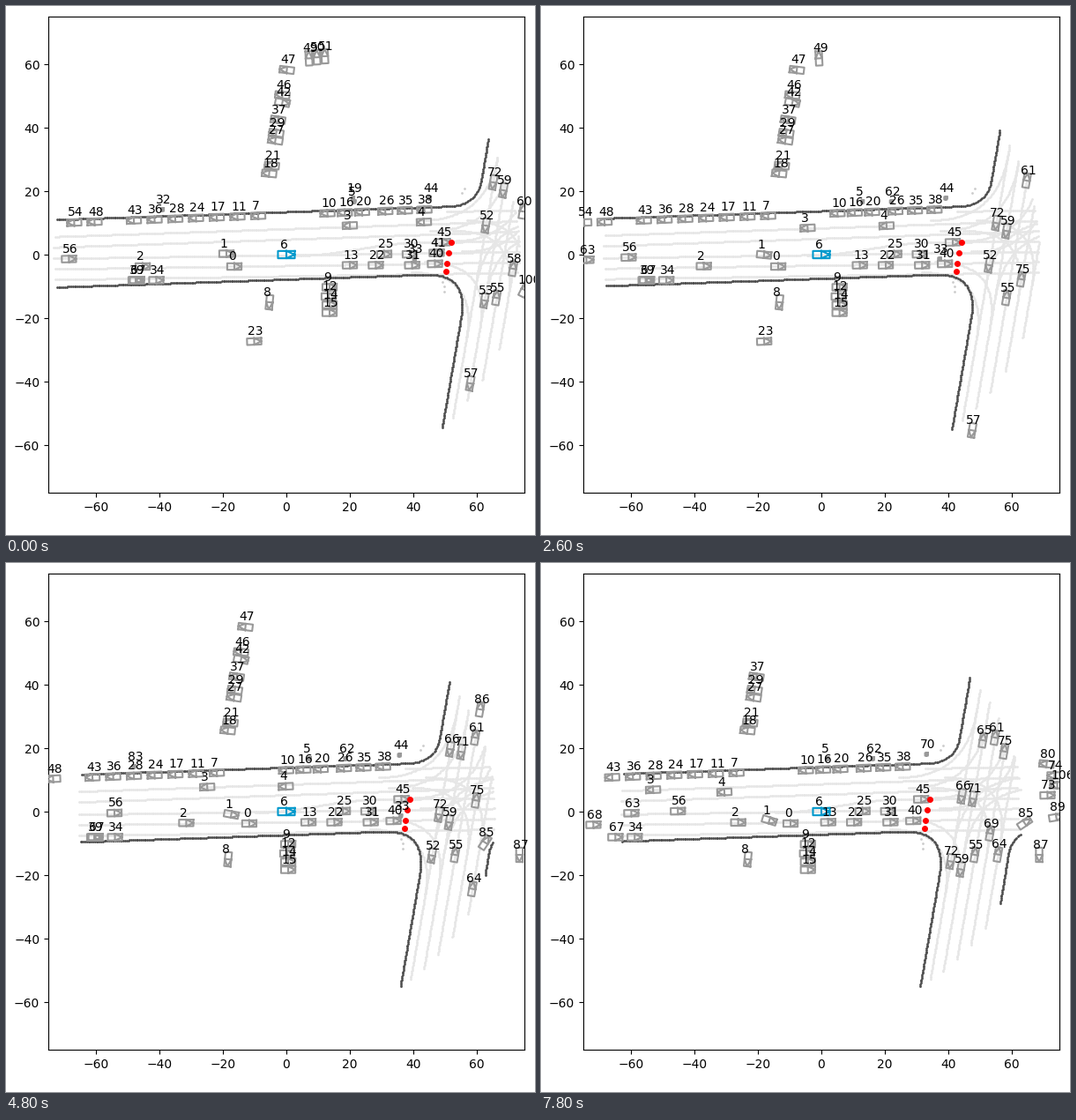
A matplotlib script that plays this animation: 600x600 px, repeating every 8000 ms.

```python
import numpy as np
import matplotlib.pyplot as plt
from matplotlib.animation import FuncAnimation

FRAMES, INTERVAL = 40, 200
SCALE, CX, CY = 3.6, 318, 282          # pixels per metre, ego position
LIMIT, VIEW = 75, 77
LAST = FRAMES - 1
PI = np.pi
TILT = 0.172                           # lean of the cross street
EAST, WEST = 0.02, PI + 0.04
NORTH, SOUTH = PI / 2 - TILT, -PI / 2 - TILT
GREY, BLUE = (0.6, 0.6, 0.6), (0.0, 0.6, 0.8)
CAR, EGO, WALKER = (4.5, 2.05), (5.3, 2.3), (0.9, 0.9)


def metres(px, py):
    return (np.asarray(px) - CX) / SCALE, (CY - np.asarray(py)) / SCALE


def travelled(k):
    """Distance covered by the braking ego car, in metres."""
    return 0.68 * k - 0.0057 * k * k


def map_radius(k):
    return 73.4 - 0.41 * k + 0.0039 * k * k


# ---- road map, laid out in pixels of the opening view ----------------------

def cross_x(lane, y):
    """Cross-street lane 0..4 at height y."""
    return 538.5 + 13.1 * lane + TILT * (CY - y)


def exit_y(lane):
    """Height of main-road lane 0..5 at the junction's far side."""
    return 243 + 11.8 * lane


def bend(a, b, c, n=30):
    a, b, c = map(np.array, (a, b, c))
    t = np.linspace(0, 1, n)[:, None]
    return (1 - t) ** 2 * a + 2 * t * (1 - t) * b + t * t * c


def turn(lane, row, side, down, reach=75):
    """Arc between a main-road lane and a cross-street lane."""
    y = exit_y(row)
    x, end = cross_x(lane, y), y + down * reach
    return bend((x + side * reach, y), (x, y), (cross_x(lane, end), end))


def resample(pts, step=0.5):
    x, y = metres(*np.array(pts, float).T)
    d = np.r_[0, np.cumsum(np.hypot(np.diff(x), np.diff(y)))]
    t = np.arange(0, d[-1], step)
    return np.column_stack([np.interp(t, d, x), np.interp(t, d, y)])


edges = [
    np.vstack([(20, 243.6), bend((500, 227.3), (534, 227), (539, 198)),
               (555, 105)]),
    np.vstack([(20, 320.2), bend((478, 304.5), (522, 304), (516.7, 350)),
               (485.8, 530)]),
    np.vstack([(630, 301), bend((611, 306), (596, 315), (594, 332)),
               (570, 480)]),
]

# five lanes fan out to leave room for the turning lane that opens midway
lanes = [[(20, 262.9 + 12 * i), (606, exit_y(row))]
         for i, row in enumerate((0, 1, 3, 4, 5))]
t = np.linspace(0, 1, 20)
lanes.append(np.column_stack([330 + 140 * t,
                              283 - 15 * t * t * (3 - 2 * t)]))
lanes.append([(470, 268), (606, exit_y(2))])
lanes.append([(500, 233), (606, exit_y(-1))])
lanes += [[(cross_x(i, y), y) for y in (552, 62)] for i in range(5)]
for n in (0, 1):
    lanes += [turn(n, 5 - n, -1, 1), turn(3 + n, 2 + n, -1, -1),
              turn(n, n, 1, 1), turn(3 + n, 1 - n, -1, 1),
              turn(n, n, -1, -1)]

edge_pts = np.vstack([resample(e) for e in edges])
lane_pts = np.vstack([resample(c) for c in lanes])
specks = np.column_stack(metres([520, 517, 495, 497, 497],
                                [207, 212, 313, 318, 324]))
lights = np.column_stack(metres([505, 502, 500, 499], [268, 280, 292, 301]))

# ---- road users -----------------------------------------------------------

agents = {}


def add(name, start, heading=0.0, vel=(0, 0), acc=(0, 0), spin=0.0,
        size=CAR, first=0, last=LAST, gap=None, relative=False):
    """Start in pixels, vel and acc in pixels per frame; gap hides it."""
    p0, v, a = (np.array(p, float) for p in (start, vel, acc))

    def state(k):
        x, y = metres(*(p0 + v * k + a * k * k))
        shown = first <= k <= last and not (gap and gap[0] <= k <= gap[1])
        return x - (0 if relative else travelled(k)), y, heading + spin * k, shown

    agents[name] = state, size


def row(names, start, end, heading=0.0, **kw):
    """Evenly spaced parked cars."""
    for name, p in zip(names, np.linspace(start, end, len(names))):
        add(name, p, heading, **kw)


def kerb(x):
    return x, 248.4 - 0.0367 * x


def drive(name, start, vel, heading=0.0, **kw):
    """Traffic whose speed is given relative to the ego car."""
    add(name, start, heading, vel, relative=True, **kw)


def cross(name, lane, y, speed, **kw):
    """Cross-street car keeping to its lane."""
    add(name, (cross_x(lane, y), y), SOUTH if speed > 0 else NORTH,
        (-TILT * speed, speed), **kw)


def walk(name, x, y, speed=0.0, first=0, last=LAST):
    add(name, (x, y), vel=(speed, 0), size=WALKER, first=first, last=last)


# kerbside, all facing west
row((54, 48), kerb(77.4), kerb(100.4), WEST)
row((43, 36, 28, 24, 17, 11, 7), kerb(145), kerb(286), WEST)
row((10, 16, 20), kerb(364.6), kerb(403.8), WEST)
row((26, 35, 38), kerb(430.2), kerb(474.6), WEST)

# side street to the north
row((18, 21), (298.5, 190), (301.5, 181), PI - 0.1)
row((27, 29), (305.5, 152.5), (306.5, 144), PI - 0.15)
add(37, (308.5, 129), PI - 0.15)
add(42, (313.5, 109.5), -0.2, last=35)
add(46, (313.5, 101), PI - 0.1, last=35)
add(47, (318.5, 72.5), PI - 0.12, last=27)
for i, name in enumerate((51, 50, 49)):
    add(name, (361.6 - 9 * i, 57 + 1.2 * i), PI / 2 + 0.05, last=3 + 6 * i)

# south side
add(8, (298.8, 336), -PI / 2 - 0.1)
add(23, (281.5, 380.5), 0.04, last=22)
row((9, 15), (367, 319), (367, 348))
row((12, 14), (366, 329.5), (367, 339), gap=(29, 34))
row((39, 34), (147, 311), (170.5, 311), last=27)
row((67, 34), (148.6, 311), (170.5, 311))

# queue in front of the lights
row((13, 22), (390, 294), (419.4, 294), EAST)
row((31, 40), (460.6, 294), (486.5, 292.5), EAST)
row((25, 30), (429, 281.5), (458, 281.5), EAST)
add(41, (488.4, 280), EAST, last=3)
add(45, (495.4, 268), EAST)

# through traffic on the main road
drive(6, (CX, CY), (0, 0), size=EGO)
drive(0, (259, 295.5), (0.85, 0), acc=(-0.006, 0))
drive(1, (250, 281), (0.23, 0), acc=(0, 0.0072), spin=-0.0077)
drive(2, (155, 295.5), (2.54, -0.03), acc=(-0.02, 0))
drive(56, (71.4, 287), (2.15, -0.14), EAST)
drive(63, (26, 290), (1.96, -0.16), EAST, first=12, gap=(23, 28))
drive(68, (-22.5, 302), (2.1, -0.13), EAST, first=36)
drive(3, (390, 249), (-6.74, 0.21), WEST)
drive(4, (474, 245), (-6.06, 0.3), WEST, acc=(-0.0195, 0.002))

# southbound lanes
cross(72, 0, 200, 3.55)
cross(52, 0, 249, 3.45, last=27)
cross(66, 0, 126, 3.55, first=22)
cross(59, 1, 209, 3.55)
cross(53, 1, 334, 3.4, last=8)
cross(57, 1, 428, 4.1, last=22)
cross(71, 1, 129, 3.55, first=17)

# northbound lanes
cross(55, 2, 331, 0)
cross(61, 2, 198, 0, first=4)
cross(86, 2, 166, 0, first=17, last=35)
cross(65, 1, 201, 0, first=36)
cross(58, 3, 298, -4.1, last=22, gap=(9, 16))
cross(60, 3, 233, -4.8, last=8)
cross(75, 3, 358, -3.7, first=10)
cross(69, 3, 451, -3.7, first=36)
cross(64, 4, 432, -2.6, first=22)

# east of the junction
add(85, (554.3, 352.3), 1.64, (1.5, -1.47), spin=-0.027, first=22)
add(89, (570.7, 305.2), 0.16, (2, -0.43), first=29)
add(100, (588, 322), 1.1, (0.8, -1.6), last=8)
add(73, (638.7, 263.5), EAST, first=29)
add(106, (649.8, 252), PI, first=29)
add(74, (646.7, 241), PI, first=36)
add(80, (637.7, 228), PI - 0.1, first=36)
add(87, (629.3, 331), -PI / 2, first=22, gap=(28, 34))

# people on foot
walk(5, 394.8, 222, -0.15)
walk(19, 393.4, 218, last=3)
walk(32, 177.4, 231, 0.6, last=8)
walk(83, 177.4, 231, 0.6, first=17, last=35)
walk(33, 463.4, 287, 1.3, last=28)
walk(104, 497.3, 285, first=30, last=35)
walk(44, 480.4, 218, 0.53, last=27)
walk(70, 480.4, 217, 0.54, first=36)
walk(62, 418.3, 222, 0.57, first=9)


def outline(x, y, angle, size):
    """Box and heading triangle as one path with breaks."""
    l, w = size[0] / 2, size[1] / 2
    gap = (np.nan, np.nan)
    pts = np.array([(l, w), (l, -w), (-l, -w), (-l, w), (l, w), gap,
                    (0, w), (0, -w), (l, 0), (0, w), gap])
    c, s = np.cos(angle), np.sin(angle)
    return pts @ np.array([[c, s], [-s, c]]) + (x, y)


# ---- figure ---------------------------------------------------------------

fig = plt.figure(figsize=(6, 6), dpi=100)
ax = fig.add_axes([0.08, 0.08, 0.9, 0.9])
ax.set_xlim(-LIMIT, LIMIT)
ax.set_ylim(-LIMIT, LIMIT)


def dots(color, size, marker=".", z=2):
    return ax.plot([], [], marker, color=color, ms=size, zorder=z)[0]


layers = [(dots((0.9,) * 3, 2), lane_pts),
          (dots((0.8,) * 3, 2), specks),
          (dots((0.3,) * 3, 2), edge_pts)]
lamp = dots("red", 4, "o", 5)
boxes, = ax.plot([], [], color=GREY, lw=1.5, zorder=4)
ego, = ax.plot([], [], color=BLUE, lw=1.5, zorder=4)
labels = {n: ax.text(0, 0, str(n), fontsize=10, zorder=10) for n in agents}


def update(k):
    shift = np.array([travelled(k), 0])
    for artist, pts in layers:
        p = pts - shift
        p = p[np.hypot(*p.T) < map_radius(k)]
        artist.set_data(*p.T)
    lamp.set_data(*(lights - shift).T)

    paths = []
    for name, (state, size) in agents.items():
        x, y, angle, shown = state(k)
        shown = shown and abs(x) < VIEW
        labels[name].set_visible(shown)
        if not shown:
            continue
        labels[name].set_position((x - 2, y + 2))
        path = outline(x, y, angle, size)
        if size is EGO:
            ego.set_data(*path.T)
        else:
            paths.append(path)
    boxes.set_data(*np.vstack(paths).T)
    return [boxes, ego, lamp]


anim = FuncAnimation(fig, update, frames=FRAMES, interval=INTERVAL,
                     init_func=lambda: update(0), repeat=True, repeat_delay=0)
plt.show()
```
